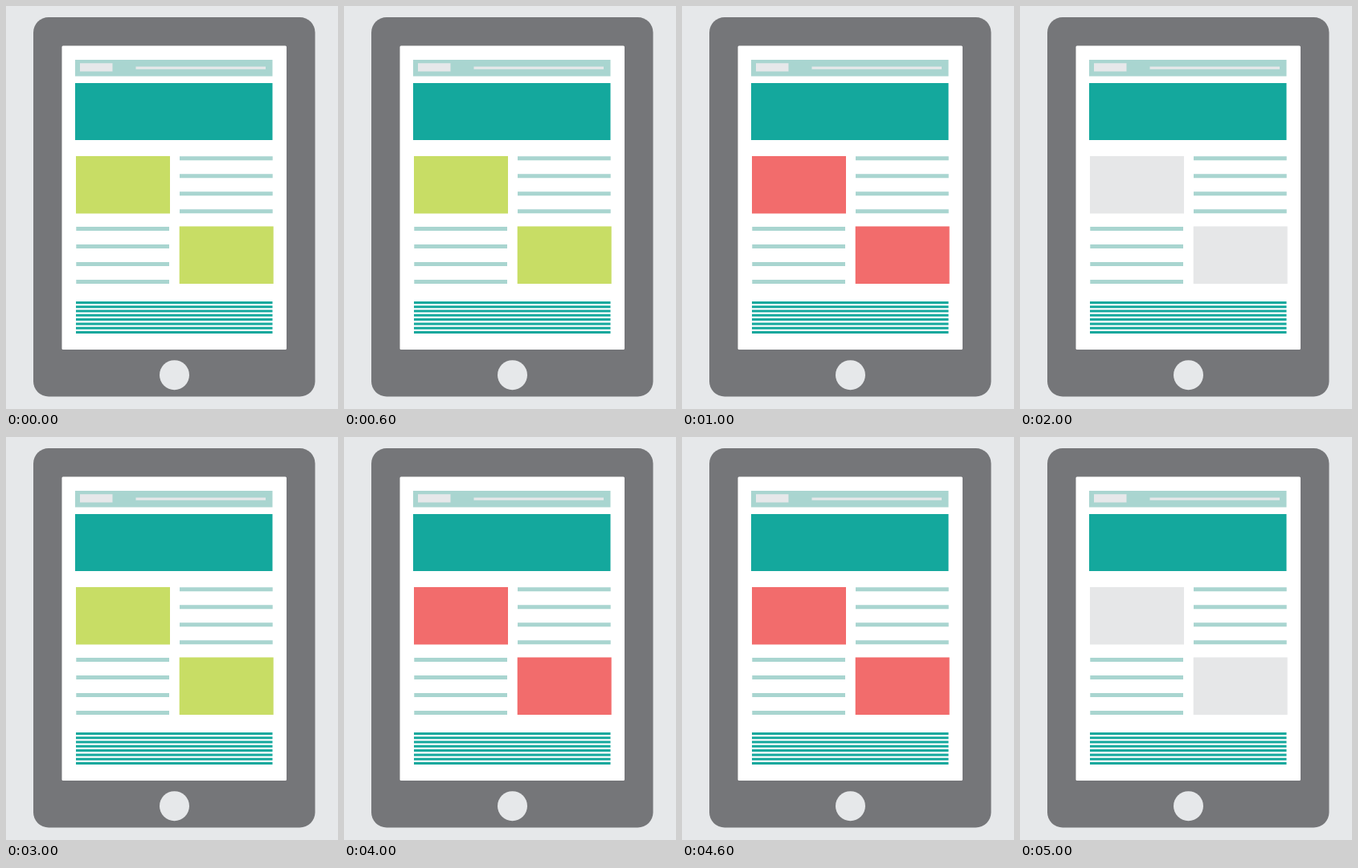
An HTML page with a canvas that plays this animation: 413 by 502 pixels, repeating every 6 s.

```html
<!DOCTYPE html>
<html lang="en">
<head>
<meta charset="utf-8">
<title>Tablet layout</title>
<style>
  html, body { margin: 0; width: 100%; height: 100%; overflow: hidden; background: #e6e8ea; }
  canvas { display: block; }
</style>
</head>
<body>
<canvas id="stage" width="413" height="502"></canvas>
<script>
const ctx = document.getElementById('stage').getContext('2d');
const GREY = '#e6e8ea', BODY = '#757679', TEAL = '#14a89d', PALE = '#a9d5d0';
const TILE_COLORS = ['#c8dd65', '#f26c6c', '#e6e7e8'];
const TILE_MS = 1000;

function box(color, x, y, w, h, radius = 0) {
  ctx.fillStyle = color;
  ctx.beginPath();
  if (radius) ctx.roundRect(x, y, w, h, radius);
  else ctx.rect(x, y, w, h);
  ctx.fill();
}

function lines(color, x, y, w, h, count, step) {
  for (let i = 0; i < count; i++) box(color, x, y + i * step, w, h);
}

function draw(time) {
  const tile = TILE_COLORS[Math.floor(time / TILE_MS) % TILE_COLORS.length];

  // Tablet
  box(GREY, 0, 0, 413, 502);
  box(BODY, 34, 14, 350.5, 472.5, 19);
  box('#fff', 69.5, 49.5, 279.5, 378.5, 1.5);
  ctx.fillStyle = GREY;
  ctx.beginPath();
  ctx.arc(209.5, 459.7, 18.5, 0, Math.PI * 2);
  ctx.fill();

  // Header and banner
  box(PALE, 86, 67, 245.5, 20.5);
  box(GREY, 92, 71.3, 40.5, 10.3);
  box(GREY, 161.5, 75.5, 161.5, 3.3);
  box(TEAL, 86, 96, 245.5, 71);

  // Content
  box(tile, 87, 187, 117, 71.5);
  lines(PALE, 216, 187.2, 115.7, 5, 4, 22);
  lines(PALE, 87.3, 275, 115.7, 5, 4, 22);
  box(tile, 215.7, 274.6, 117, 71.5);

  // Footer
  lines(TEAL, 87, 368, 244.5, 3, 8, 5.28);
}

function frame() {
  draw(performance.now());
  requestAnimationFrame(frame);
}
frame();
</script>
</body>
</html>
```
